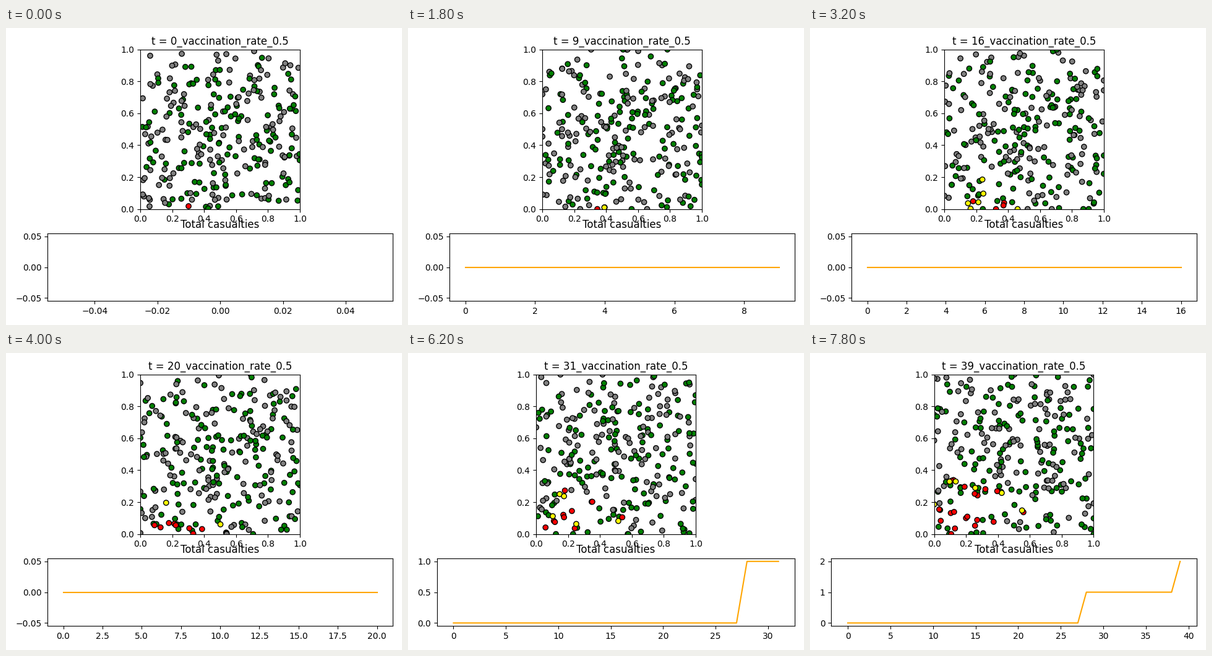
A matplotlib script for the animation above (8 s loop, 640 by 480 pixels).

```python
import numpy as np
import matplotlib.pyplot as plt
from matplotlib.animation import FuncAnimation

W, H, DPI = 640, 480, 100
STEPS, PEOPLE, STEP_SIZE = 40, 270, 0.025
INCUBATION = 5
DEATHS = (28, 39)
START = (0.302, 0.018)

GRAY, GREEN, YELLOW, RED = range(4)
COLORS = np.array(["gray", "green", "yellow", "red"])


def total_cases(t):
    return int(np.interp(t, [0, 9, 16, 26, 39], [1, 2, 10, 12, 27]))


def random_walks(rng):
    path = np.empty((STEPS, PEOPLE, 2))
    path[0] = rng.random((PEOPLE, 2))
    path[0, 0] = START
    for t in range(1, STEPS):
        step = rng.normal(0, STEP_SIZE, (PEOPLE, 2))
        path[t] = np.clip(path[t - 1] + step, 0, 1)
    return path


def closest(points, healthy, ill):
    """The healthy person with the shortest distance to anyone ill."""
    gaps = points[healthy][:, None] - points[ill]
    return healthy[np.hypot(gaps[..., 0], gaps[..., 1]).min(axis=1).argmin()]


def simulate():
    rng = np.random.default_rng(8)
    path = random_walks(rng)
    state = np.full((STEPS, PEOPLE), GRAY)
    state[:, 1 + rng.permutation(PEOPLE - 1)[:PEOPLE // 2]] = GREEN
    state[:, 0] = RED
    ill, cases = [0], 1
    for t in range(STEPS):
        while cases < total_cases(t):
            p = closest(path[t], np.flatnonzero(state[t] == GRAY), ill)
            state[t:, p] = YELLOW
            state[t + INCUBATION:, p] = RED
            ill.append(p)
            cases += 1
        if t in DEATHS:
            path[t:, ill.pop(0)] = np.nan
    return path, state


path, state = simulate()
deaths = np.array([sum(t >= d for d in DEATHS) for t in range(STEPS)])

fig = plt.figure(figsize=(W / DPI, H / DPI), dpi=DPI)
top = fig.add_axes([0, 0, 1, 1])
low = fig.add_axes([0, 0, 1, 1])
top.set(xlim=(0, 1), ylim=(0, 1))
low.set_title("Total casualties")
dots = top.scatter(path[0, :, 0], path[0, :, 1], edgecolors="black",
                   linewidths=1)
line, = low.plot([], [], color="orange")


def place(ax, left, upper, right, lower):
    ax.set_position([left / W, 1 - lower / H,
                     (right - left) / W, (lower - upper) / H])


def layout(total):
    # The left margin follows the width of the y tick labels
    left, right = (67.2, 47.2, 34.2)[total], 625
    upper, lower = 34.8, 292.6
    mid, half = (left + right) / 2, (lower - upper) / 2
    place(top, mid - half, upper, mid + half, lower)
    place(low, left, 331.8, right, 441.3)


def update(t):
    order = np.argsort(state[t] >= YELLOW, kind="stable")
    dots.set_offsets(path[t, order])
    dots.set_facecolor(COLORS[state[t, order]])
    top.set_title(f"t = {t}_vaccination_rate_0.5")
    line.set_data(np.arange(t + 1), deaths[:t + 1])
    low.relim()
    low.autoscale(True)
    low.autoscale_view()
    layout(deaths[t])
    return dots, line


anim = FuncAnimation(fig, update, frames=STEPS, interval=200,
                     init_func=lambda: update(0), repeat=True, blit=False)
plt.show()
```
